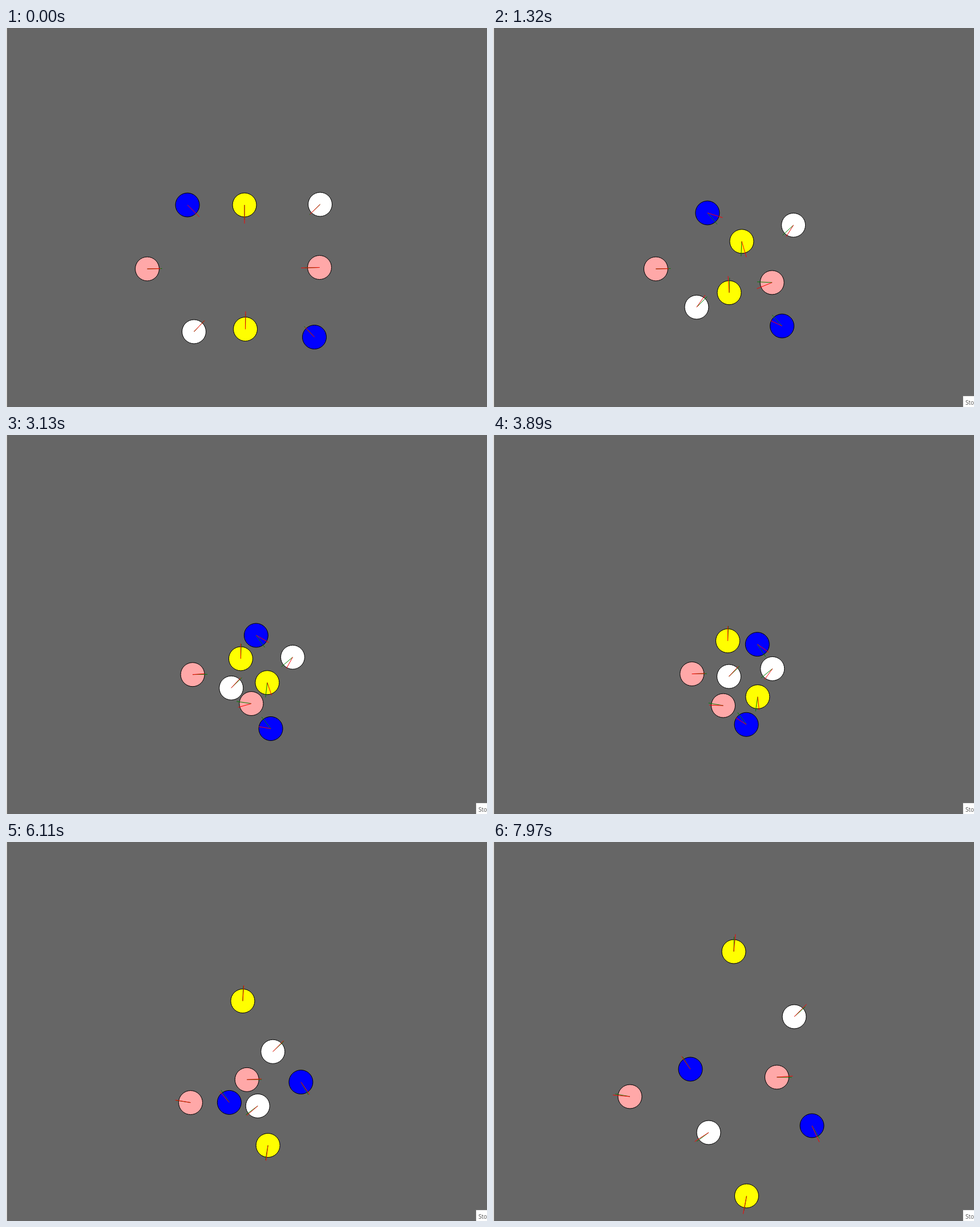
An HTML page with a canvas for the animation above (8000 ms loop, 843 px wide and 664 px high).

```html
<!DOCTYPE html>
<html lang="en">
<head>
<meta charset="utf-8">
<title>Crossing agents</title>
<style>
  html, body { margin: 0; width: 100%; height: 100%; overflow: hidden; background: #666; }
  canvas { display: block; }
</style>
</head>
<body>
<canvas id="stage" width="843" height="664"></canvas>
<script>
const ctx = document.getElementById('stage').getContext('2d');
const LOOP = 8000;
const STEP = 140;
const RADIUS = 21;
const AIM = 26;

// The picture advances in even steps of about STEP between these times.
const MARKS = [0, 70, 1170, 2340, 3430, 4540, 5640, 6810, 7900, 7970, LOOP];

// Times at which an agent passes the points of its path.
const TIMES = [0, 1320, 3890, 5250, 7970];

const BLUE = '#00f', YELLOW = '#ff0', WHITE = '#fff', PINK = '#ffa8a8';
const AGENTS = [
  { color: BLUE, goal: [640, 632], path: [[318, 310], [376, 324], [464.5, 367.5], [497.5, 396], [559, 497]] },
  { color: YELLOW, goal: [418, 770], path: [[418, 310], [436, 374], [464, 460], [462.5, 500.5], [444.5, 620]] },
  { color: WHITE, goal: [230, 620], path: [[550.5, 309], [526.5, 345.5], [489, 410.5], [462.5, 442.5], [378, 509]] },
  { color: PINK, goal: [650, 414], path: [[247.5, 422], [285.5, 422], [350, 418.5], [393, 417.5], [497.5, 412]] },
  { color: PINK, goal: [150, 430], path: [[549.5, 419.5], [489, 446], [402, 474], [355.5, 462.5], [240, 446]] },
  { color: WHITE, goal: [630, 215], path: [[329.5, 532], [357, 489], [414.5, 422], [445.5, 390], [528, 306]] },
  { color: YELLOW, goal: [427, -50], path: [[419.5, 527.5], [414, 463.5], [411.5, 359], [413, 311.5], [422, 192]] },
  { color: BLUE, goal: [230, 215], path: [[540.5, 541.5], [506.5, 522], [443, 506.5], [411, 477.5], [346, 398]] }
];

function stepTime(now) {
  const i = MARKS.findLastIndex(m => m <= now);
  const span = MARKS[i + 1] - MARKS[i];
  const step = span / Math.max(1, Math.round(span / STEP));
  return MARKS[i] + Math.floor((now - MARKS[i]) / step) * step;
}

const gap = i => TIMES[i + 1] - TIMES[i];
const speed = (v, i) => (v[i + 1] - v[i]) / gap(i);

// Slope of the parabola through a point and its neighbours.
function slope(v, i) {
  const last = v.length - 1;
  if (i === 0) return 2 * speed(v, 0) - slope(v, 1);
  if (i === last) return 2 * speed(v, last - 1) - slope(v, last - 1);
  return (gap(i) * speed(v, i - 1) + gap(i - 1) * speed(v, i)) / (gap(i - 1) + gap(i));
}

// Cubic Hermite through the values v at TIMES.
function curve(v, t) {
  let i = 0;
  while (i < TIMES.length - 2 && t >= TIMES[i + 1]) i++;
  const u = (t - TIMES[i]) / gap(i);
  return v[i] + (v[i + 1] - v[i]) * u * u * (3 - 2 * u)
    + gap(i) * u * (1 - u) * ((1 - u) * slope(v, i) - u * slope(v, i + 1));
}

const position = (agent, t) => [0, 1].map(axis => curve(agent.path.map(p => p[axis]), t));

function ray(x, y, angle, length, color) {
  ctx.strokeStyle = color;
  ctx.beginPath();
  ctx.moveTo(x, y);
  ctx.lineTo(x + length * Math.cos(angle), y + length * Math.sin(angle));
  ctx.stroke();
}

// Green points to the goal, red along the velocity.
function drawAgent(agent, t) {
  const [x, y] = position(agent, t);
  const [x0, y0] = position(agent, t - 5), [x1, y1] = position(agent, t + 5);
  const vx = (x1 - x0) / 10, vy = (y1 - y0) / 10;
  const heading = Math.atan2(agent.goal[1] - y, agent.goal[0] - x);
  const diff = Math.atan2(vy, vx) - heading;
  const turn = Math.atan2(Math.sin(diff), Math.cos(diff)) * Math.min(1, t / 500);

  ctx.beginPath();
  ctx.arc(x, y, RADIUS, 0, Math.PI * 2);
  ctx.fillStyle = agent.color;
  ctx.fill();
  ctx.strokeStyle = '#000';
  ctx.stroke();
  ray(x, y, heading, AIM, '#008000');
  ray(x, y, heading + turn, 12 + 370 * Math.hypot(vx, vy), '#f00');
}

function drawTip() {
  ctx.fillStyle = '#767676';
  ctx.fillRect(823, 644, 20, 20);
  ctx.fillStyle = '#fff';
  ctx.fillRect(824, 645, 19, 19);
  ctx.fillStyle = '#505050';
  ctx.font = '10px "Open Sans", sans-serif';
  ctx.fillText('Sto', 828, 660);
}

function frame() {
  const t = stepTime(performance.now() % LOOP);
  ctx.fillStyle = '#666';
  ctx.fillRect(0, 0, 843, 664);
  ctx.fillStyle = '#fff';
  ctx.fillRect(0, 0, 1.5, 664);
  ctx.lineWidth = 1;
  AGENTS.forEach(agent => drawAgent(agent, t));
  if (t >= 500) drawTip();
  requestAnimationFrame(frame);
}
requestAnimationFrame(frame);
</script>
</body>
</html>
```
